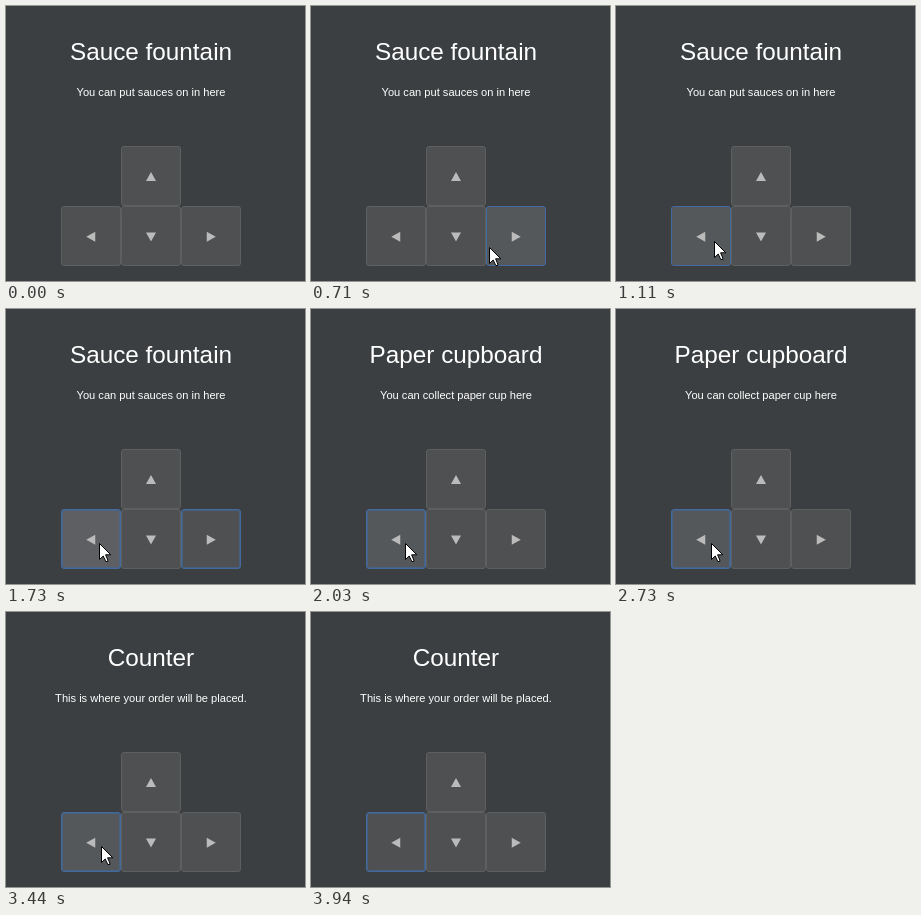
An HTML page for the animation above (5040 ms loop, 299 by 275 pixels).

```html
<!DOCTYPE html>
<html lang="en">
<head>
<meta charset="utf-8">
<title>Arrow pad</title>
<style>
html, body { margin: 0; width: 100%; height: 100%; overflow: hidden; background: #3c3f41; }
svg { display: block; }
text { fill: #fff; text-anchor: middle; font-family: "Liberation Sans", Arial, sans-serif; }
#title { font-size: 24.3px; }
#note { font-size: 11.1px; }
.box { fill: #4e5052; stroke: #5e6060; }
.hover .box { fill: #55585a; stroke: #426a9e; }
.focus .box { stroke: #426a9e; }
.press .box { fill: #5d5f62; }
.ring { fill: none; stroke: #426a9e; stroke-opacity: .6; visibility: hidden; }
.focus .ring { visibility: visible; }
.arrow { fill: #bbb; }
#cursor { fill: #fff; stroke: #000; }
</style>
</head>
<body>
<svg width="299" height="275" viewBox="0 0 299 275">
  <text id="title" x="145" y="54"></text>
  <text id="note" x="145" y="90"></text>
  <g id="pad"></g>
  <path id="cursor" d="M.5 .5V16.5L4.2 13 6.8 18.5H8.8V17L6.6 11.8H11.8Z"/>
</svg>
<script>
const LOOP = 5040, STEP = 100, SIZE = 60;
const CLICKS = [1730, 3340];
const PAGES = [
  ["Sauce fountain", "You can put sauces on in here"],
  ["Paper cupboard", "You can collect paper cup here"],
  ["Counter", "This is where your order will be placed."]
];

// column, row, arrow angle
const KEYS = {
  up: [0, -1, 0],
  left: [-1, 0, -90],
  down: [0, 0, 180],
  right: [1, 0, 90]
};

// Pointer path: start time, duration, destination
const ENTER = 310, LEAVE = 3940;
const LEGS = [
  [ENTER, 100, 187, 241],
  [610, 100, 178, 241],
  [710, 500, 97, 235],
  [1210, 200, 93, 234],
  [1930, 100, 94, 234],
  [2630, 100, 95, 234],
  [3640, 200, 102, 244]
];

const $ = id => document.getElementById(id);
const within = (v, from, size) => v >= from && v < from + size;
const easeOut = p => 1 - (1 - p) ** 3;
const corner = ([col, row]) => [115 + col * SIZE, 200 + row * SIZE];

$("pad").innerHTML = Object.entries(KEYS).map(([id, key]) =>
  `<g id="${id}" transform="translate(${corner(key)})">
    <rect class="box" x=".5" y=".5" width="59" height="59" rx="2.5"/>
    <rect class="ring" x="1.5" y="1.5" width="57" height="57" rx="1.5"/>
    <path class="arrow" d="M30 26L35 35H25Z" transform="rotate(${key[2]} 30 30.75)"/>
  </g>`).join("");

function pointer(t) {
  let x = 198, y = 245;
  for (const [start, time, toX, toY] of LEGS) {
    if (t < start) break;
    const stepped = Math.floor((t - start) / STEP) * STEP;
    const p = easeOut(Math.min(1, stepped / time));
    x += (toX - x) * p;
    y += (toY - y) * p;
  }
  return [Math.round(x), Math.round(y)];
}

function draw(now) {
  const t = now % LOOP;
  const [x, y] = pointer(t);
  const shown = within(t, ENTER, LEAVE - ENTER);
  $("cursor").style.visibility = shown ? "visible" : "hidden";
  $("cursor").setAttribute("transform", `translate(${x} ${y})`);

  // The page turns one step after each click
  const [title, note] = PAGES[CLICKS.filter(c => t >= c + STEP).length];
  $("title").textContent = title;
  $("note").textContent = note;

  const pressed = CLICKS.some(c => within(t, c, STEP));
  const focused = { left: t >= CLICKS[0], right: within(t, CLICKS[0], STEP) };
  for (const id in KEYS) {
    const [left, top] = corner(KEYS[id]);
    const { classList } = $(id);
    const over = shown && within(x, left, SIZE) && within(y, top, SIZE);
    classList.toggle("hover", over);
    classList.toggle("press", over && pressed);
    classList.toggle("focus", !!focused[id]);
  }
}

let start;
function tick(now) {
  start ??= now;
  draw(now - start);
  requestAnimationFrame(tick);
}
draw(0);
requestAnimationFrame(tick);
</script>
</body>
</html>
```
